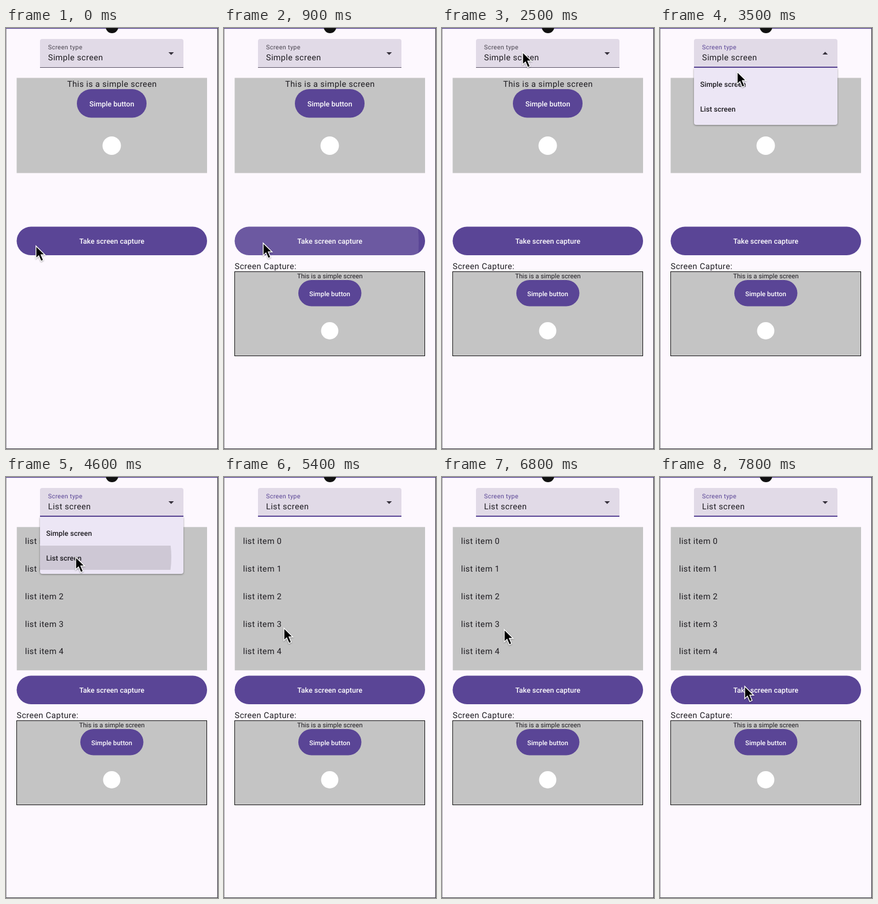
These frames come from a looping animation (368 px wide and 730 px high, 8000 ms). An HTML page:

```html
<!DOCTYPE html>
<html lang="en">
<head>
<meta charset="utf-8">
<title>Screen capture demo</title>
<style>
html, body { margin: 0; width: 100%; height: 100%; overflow: hidden; background: #fdf8fe; }
svg { display: block; width: 100%; height: 100%; }
text { font: 14.3px Roboto, sans-serif; letter-spacing: .45px; fill: #1d1b20; text-rendering: geometricPrecision; }
text.med { font-size: 12.4px; font-weight: 500; letter-spacing: .06px; }
text.small { font-size: 10.74px; letter-spacing: .36px; fill: #4a4550; }
text.on { fill: #fff; }
.mid { text-anchor: middle; }
.purple { fill: #5a4596; }
.grey { fill: #c4c4c4; }
#menuBox { fill: #ece6f5; filter: drop-shadow(0 1px 1.5px #0006); }
.focus #label { fill: #5a4596; }
.focus #line { fill: #5a4596; y: 67px; height: 2px; }
</style>
</head>
<body>
<svg viewBox="0 0 368 730">
  <defs>
    <clipPath id="listClip"><rect x="18.5" y="86.5" width="330.5" height="249"/></clipPath>
    <clipPath id="takeClip"><rect x="18.5" y="344.5" width="330.5" height="49.5" rx="24.75"/></clipPath>
    <clipPath id="optionClip"><rect x="59" y="119" width="249" height="42"/></clipPath>
  </defs>
  <rect width="368" height="730" fill="#fdf8fe"/>

  <g id="field">
    <path d="M59 69V23q0-4 4-4H304q4 0 4 4V69Z" fill="#e1dae7"/>
    <rect id="line" x="59" y="68" width="249" height="1" fill="#5c5567"/>
    <text id="label" class="small" x="73" y="37">Screen type</text>
    <text id="value" x="73" y="56"></text>
    <path id="arrow" d="M282 42h9.4l-4.7 4.7Z" fill="#37323d"/>
  </g>

  <g id="simple">
    <rect class="grey" x="18.5" y="86.5" width="330.5" height="165"/>
    <text class="mid" x="184" y="102">This is a simple screen</text>
    <rect class="purple" x="123" y="106" width="121" height="49.5" rx="24.75"/>
    <text class="med on mid" x="183.7" y="135.7">Simple button</text>
    <circle cx="183.5" cy="204" r="16" fill="#fff"/>
  </g>

  <g id="list" clip-path="url(#listClip)">
    <rect class="grey" x="18.5" y="86.5" width="330.5" height="249"/>
    <g id="items"></g>
  </g>

  <g clip-path="url(#takeClip)">
    <rect class="purple" x="18" y="344" width="332" height="51"/>
    <circle id="takeRipple" cx="68" cy="373" fill="#fff"/>
  </g>
  <text class="med on mid" x="183.7" y="374.2">Take screen capture</text>

  <g id="capture">
    <text x="18.5" y="418">Screen Capture:</text>
    <rect class="grey" x="18.5" y="422.5" width="330" height="146" stroke="#111"/>
    <text class="mid" x="183.8" y="434.4" style="font-size:11.2px;letter-spacing:0">This is a simple screen</text>
    <rect class="purple" x="129" y="437" width="109.5" height="45.5" rx="22.75"/>
    <text class="med on mid" x="183.6" y="464.6" style="font-size:11.3px">Simple button</text>
    <circle cx="183.5" cy="525" r="15" fill="#fff"/>
  </g>

  <g id="menu">
    <path id="menuBox" d="M59 69.5H308V164q0 4-4 4H63q-4 0-4-4Z"/>
    <circle cx="121" cy="139" r="166" id="optionRipple" clip-path="url(#optionClip)" opacity=".13"/>
    <text class="med" x="69.7" y="102.3">Simple screen</text>
    <text class="med" x="69.7" y="145">List screen</text>
  </g>

  <path d="M0 0H368V1.3H0Z" fill="#4f3d8a"/>
  <path d="M0 1H.8V730H0Z" fill="#8f8a95"/>
  <path d="M366.8 1H368V730H0V729H366.8Z" fill="#45414b"/>
  <circle cx="184" cy="-2" r="11" fill="#111"/>

  <path id="cursor" d="M0 0V21.5L4.8 17 8.8 26.3 12.9 24.5 8.9 15.3H15.5Z" fill="#000"
    stroke="#fff" stroke-width="1.4" style="filter:drop-shadow(0 1px 1px #0005)"/>
</svg>
<script>
const LOOP = 8000, STEP = 100;
const $ = id => document.getElementById(id);
const show = (id, on) => $(id).style.display = on ? "" : "none";
const clamp = (v, lo, hi) => Math.min(hi, Math.max(lo, v));

// Pointer path: time, x, y
const path = [
  [0, 52, 378], [300, 68, 373], [1400, 68, 373], [1600, 78, 335], [2100, 133, 68],
  [2300, 140, 42], [3200, 140, 42], [3500, 134, 76], [4000, 122, 134], [4200, 121, 139],
  [4800, 121, 139], [5000, 117, 172], [5400, 104, 262], [5600, 104, 262], [6200, 105, 78],
  [6300, 105, 71], [6500, 105, 95], [6900, 109, 321], [7000, 109, 321], [7600, 142, 358],
  [7800, 147, 363], [LOOP, 147, 363]
];

function pointer(t) {
  const i = path.findIndex(k => k[0] > t);
  const [t0, x0, y0] = path[i - 1], [t1, x1, y1] = path[i];
  const p = (t - t0) / (t1 - t0);
  return [x0 + (x1 - x0) * p, y0 + (y1 - y0) * p];
}

$("items").innerHTML = Array.from({ length: 9 }, (_, i) =>
  `<text x="33" y="${116.4 + i * 47.7}">list item ${i}</text>`).join("");

function draw(t) {
  const [x, y] = pointer(t);
  $("cursor").setAttribute("transform", `translate(${x} ${y})`);

  const picked = t >= 4600;
  show("simple", !picked);
  show("list", picked);
  $("value").textContent = picked ? "List screen" : "Simple screen";
  const dragging = t > 5600 && t < 6900;
  const scroll = dragging ? clamp(256 - y, 0, 185) : 0;
  $("items").setAttribute("transform", `translate(0 ${-scroll})`);

  show("capture", t >= 900);
  show("takeRipple", t >= 900 && t < 1200);
  $("takeRipple").setAttribute("r", 270 + (t - 900));
  $("takeRipple").setAttribute("opacity", t < 1100 ? .105 : .05);

  const open = t >= 2900 && !picked;
  $("field").setAttribute("class", t >= 2900 ? "focus" : "");
  $("arrow").setAttribute("transform", open ? "rotate(180 286.7 44)" : "");
  show("menu", t >= 2900 && t < 4700);
  show("optionRipple", picked);
  const grow = clamp((t - 2800) / 300, 0, 1);
  const scale = 1 - .2 * (1 - grow) ** 2;
  $("menu").setAttribute("transform", `translate(183.5 69) scale(${scale}) translate(-183.5 -69)`);
  $("menu").setAttribute("opacity", Math.min(1, grow * 1.8));
}

function frame() {
  const t = performance.now() % LOOP;
  draw(Math.floor(t / STEP) * STEP);
  requestAnimationFrame(frame);
}
frame();
</script>
</body>
</html>
```
